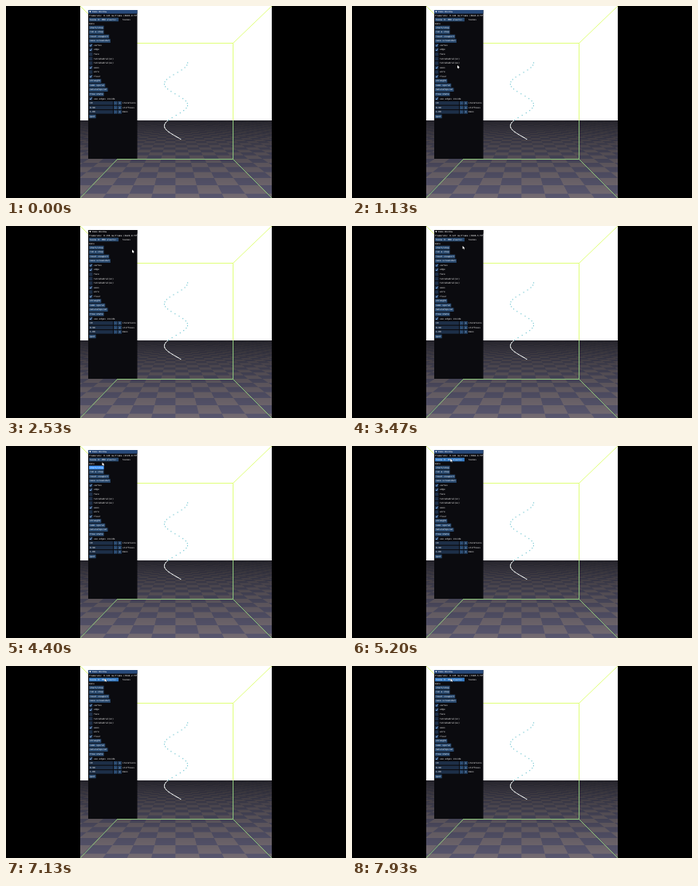
Write an HTML page with a canvas that moves like this. It is 426x240 px and loops after 8000 ms.

```html
<!DOCTYPE html>
<html lang="en">
<head>
<meta charset="utf-8">
<title>Elastic rod viewer</title>
<style>
html, body { margin: 0; width: 100%; height: 100%; overflow: hidden; background: #000; }
canvas { display: block; }
</style>
</head>
<body>
<canvas id="stage" width="426" height="240"></canvas>
<script>
const W = 426, H = 240, LOOP = 8000, FPS = 15;
const VIEW = { x: 93, w: 240, horizon: 143, cx: 212.5, cy: 118.5 };
const FOCAL = 290, TILE = 0.25;
const ROW = 5.55, FIRST_ROW = 27, LEFT = 104;
const FONT = '2.76px "DejaVu Sans Mono", monospace';
const BLUE = '#294a7a', BUTTON = '#28496f', FIELD = '#1d2f48';
const HOVER = '#4296fa', FIELD_HOVER = '#3478c0', PANEL = '#0b0b0f';
const ctx = document.getElementById('stage').getContext('2d');

const mix = (a, b, k) => a + (b - a) * k;
const smooth = k => k * k * (3 - 2 * k);
const clamp = k => Math.min(1, Math.max(0, k));

function layer(draw) {
  const c = document.createElement('canvas');
  c.width = W;
  c.height = H;
  draw(c.getContext('2d'));
  return c;
}

function rect(g, x, y, w, h, color) {
  g.fillStyle = color;
  g.fillRect(x, y, w, h);
}

function label(g, text, x, y, color = '#fff') {
  g.font = FONT;
  g.textBaseline = 'middle';
  g.fillStyle = color;
  g.fillText(text, x, y);
}

function button(g, text, y, color = BUTTON, w = text.length * 1.66 + 2) {
  rect(g, LEFT, y - 2.3, w, 4.6, color);
  label(g, text, LEFT + 1, y);
}

// Perspective checkerboard, shaded from dark at the far edge to grey up close
function drawFloor(g) {
  const top = VIEW.horizon, h = H - top;
  const img = g.createImageData(VIEW.w, h);
  const sub = [0.17, 0.5, 0.83];
  for (let py = 0; py < h; py++) {
    const light = Math.pow(py / h, 0.65);
    for (let px = 0; px < VIEW.w; px++) {
      let cover = 0;
      for (const sy of sub) for (const sx of sub) {
        const z = FOCAL / (top + py + sy - VIEW.cy);
        const x = (VIEW.x + px + sx - VIEW.cx) * z / FOCAL;
        cover += (Math.floor(x / TILE) + Math.floor(z / TILE)) & 1;
      }
      const k = cover / 9, i = (py * VIEW.w + px) * 4;
      img.data[i] = mix(mix(32, 37, k), mix(88, 116, k), light);
      img.data[i + 1] = mix(mix(32, 35, k), mix(86, 107, k), light);
      img.data[i + 2] = mix(mix(40, 41, k), mix(110, 114, k), light);
      img.data[i + 3] = 255;
    }
  }
  g.putImageData(img, VIEW.x, top);
}

function drawBox(g) {
  const l = 139.5, r = 284.5, t = 46.5, b = 191.5;
  const right = VIEW.x + VIEW.w;
  const paint = (y, h, color) => {
    g.save();
    g.beginPath();
    g.rect(VIEW.x, y, VIEW.w, h);
    g.clip();
    g.strokeStyle = color;
    g.lineWidth = 1;
    g.strokeRect(l, t, r - l, b - t);
    g.beginPath();
    for (const [x1, y1, x2, y2] of [
      [l, t, VIEW.x, 0], [r, t, right, 0],
      [l, b, VIEW.x, H], [r, b, right, H]
    ]) {
      g.moveTo(x1, y1);
      g.lineTo(x2, y2);
    }
    g.stroke();
    g.restore();
  };
  paint(0, VIEW.horizon, '#e0ff7c');
  paint(VIEW.horizon, H - VIEW.horizon, '#8cc47c');
}

function rodPoint(k) {
  const turn = k * 3.63;
  return [213 + 14.6 * Math.cos(turn * Math.PI), 71 + turn * 26.3];
}

function drawRod(g) {
  g.beginPath();
  for (let i = 0; i <= 120; i++) g.lineTo(...rodPoint(i / 120));
  g.strokeStyle = '#fff';
  g.lineWidth = 1;
  g.stroke();
  const count = 32;
  for (let i = 0; i <= count; i++) {
    const [x, y] = rodPoint(i / count);
    const color = y > VIEW.horizon ? '#e8f6f4' : '#5fbfcb';
    rect(g, x - 0.55, y - 0.55, 1.1, 1.1, color);
  }
}

function check(g, text, on, y) {
  rect(g, LEFT, y - 2.2, 4.4, 4.4, FIELD);
  if (on) {
    g.beginPath();
    g.moveTo(LEFT + 1, y);
    g.lineTo(LEFT + 1.9, y + 1.2);
    g.lineTo(LEFT + 3.5, y - 1.3);
    g.strokeStyle = '#8dc2ff';
    g.lineWidth = 0.8;
    g.stroke();
  }
  label(g, text, LEFT + 6, y);
}

function number(g, value, text, y) {
  rect(g, LEFT, y - 2.2, 30, 4.4, FIELD);
  label(g, value, LEFT + 1, y);
  ['-', '+'].forEach((sign, i) => {
    const x = 135 + i * 5.3;
    rect(g, x, y - 2.2, 4.5, 4.4, BUTTON);
    label(g, sign, x + 1.4, y);
  });
  label(g, text, 146, y);
}

const rowY = i => FIRST_ROW + ROW * i;

function drawTitle(g, focused) {
  rect(g, 103, 5, 61.5, 4.6, focused ? BLUE : PANEL);
  g.fillStyle = '#fff';
  g.beginPath();
  g.moveTo(104.2, 6.2);
  g.lineTo(106.6, 6.2);
  g.lineTo(105.4, 8.2);
  g.fill();
  label(g, 'Demo Window', 108, 7.3);
}

function drawPanel(g) {
  rect(g, 103, 5, 61.5, 186, PANEL);
  label(g, 'Scenes', 146, 17);
  label(g, 'menu', LEFT, 22.3);

  const rows = [
    [button, 'start/stop'], [button, 'run a step'],
    [button, 'reset viewport'], [button, 'save screenshot'],
    [check, 'vertex', 1], [check, 'edge', 1], [check, 'face', 0],
    [check, 'tetrahedral(in)', 0], [check, 'tetrahedral(ex)', 0],
    [check, 'axes', 1], [check, 'wire', 0], [check, 'floor', 1],
    [button, 'straight'], [button, 'semi spiral'],
    [button, 'naturalSpiral'], [button, 'free state'],
    [check, 'use edges inside', 1],
    [number, '10', 'iterations'], [number, '0.90', 'stiffness'],
    [number, '1.00', 'mass'], [button, 'quit']
  ];
  rows.forEach(([widget, ...args], i) => widget(g, ...args, rowY(i)));
}

const backdrop = layer(g => {
  rect(g, 0, 0, W, H, '#000');
  rect(g, VIEW.x, 0, VIEW.w, VIEW.horizon, '#fff');
  drawFloor(g);
  drawBox(g);
  drawRod(g);
  drawPanel(g);
});

// time, x, y of the pointer tip
const path = [
  [600, 138, 96], [1050, 132, 74], [1300, 132, 74], [2400, 158, 29.5],
  [2750, 158, 29.5], [4150, 120.5, 20.5], [4700, 120.5, 20.5], [5300, 123.5, 15.5]
];

function pointer(t) {
  if (t < path[0][0]) return null;
  const i = path.findIndex(p => p[0] > t);
  if (i < 0) return path[path.length - 1].slice(1);
  const [t0, x0, y0] = path[i - 1], [t1, x1, y1] = path[i];
  const k = smooth(clamp((t - t0) / (t1 - t0)));
  return [mix(x0, x1, k), mix(y0, y1, k)];
}

function drawPointer(x, y) {
  ctx.beginPath();
  for (const [dx, dy] of [[0, 0], [0, 4], [1, 3.2], [1.7, 4.6], [2.3, 4.3], [1.7, 2.9], [2.9, 2.8]]) {
    ctx.lineTo(x + dx, y + dy);
  }
  ctx.closePath();
  ctx.strokeStyle = '#000';
  ctx.lineWidth = 0.5;
  ctx.stroke();
  ctx.fillStyle = '#fff';
  ctx.fill();
}

function drawRate(step) {
  const ms = 0.143 + 0.012 * Math.sin(step * 0.21) + 0.006 * Math.sin(step * 0.83);
  const text = `Framerate: ${ms.toFixed(3)} ms/frame (${(1000 / ms).toFixed(1)} FPS)`;
  ctx.save();
  ctx.beginPath();
  ctx.rect(103, 9.6, 61, 6);
  ctx.clip();
  label(ctx, text, LEFT, 12.5);
  ctx.restore();
}

function draw(time) {
  const step = Math.floor((time % LOOP) * FPS / 1000 + 0.05);
  const t = step * 1000 / FPS;
  ctx.drawImage(backdrop, 0, 0);
  drawTitle(ctx, t < 1800 || t > 4200);
  drawRate(step);
  button(ctx, 'Scene 0: PBD elastic', 17, t > 4950 ? FIELD_HOVER : BUTTON, 37);
  if (t > 3950 && t <= 4950) button(ctx, 'start/stop', rowY(0), HOVER);
  const p = pointer(t);
  if (p) drawPointer(...p);
}

const start = performance.now();
function tick() {
  draw(performance.now() - start);
  requestAnimationFrame(tick);
}
tick();
</script>
</body>
</html>
```
